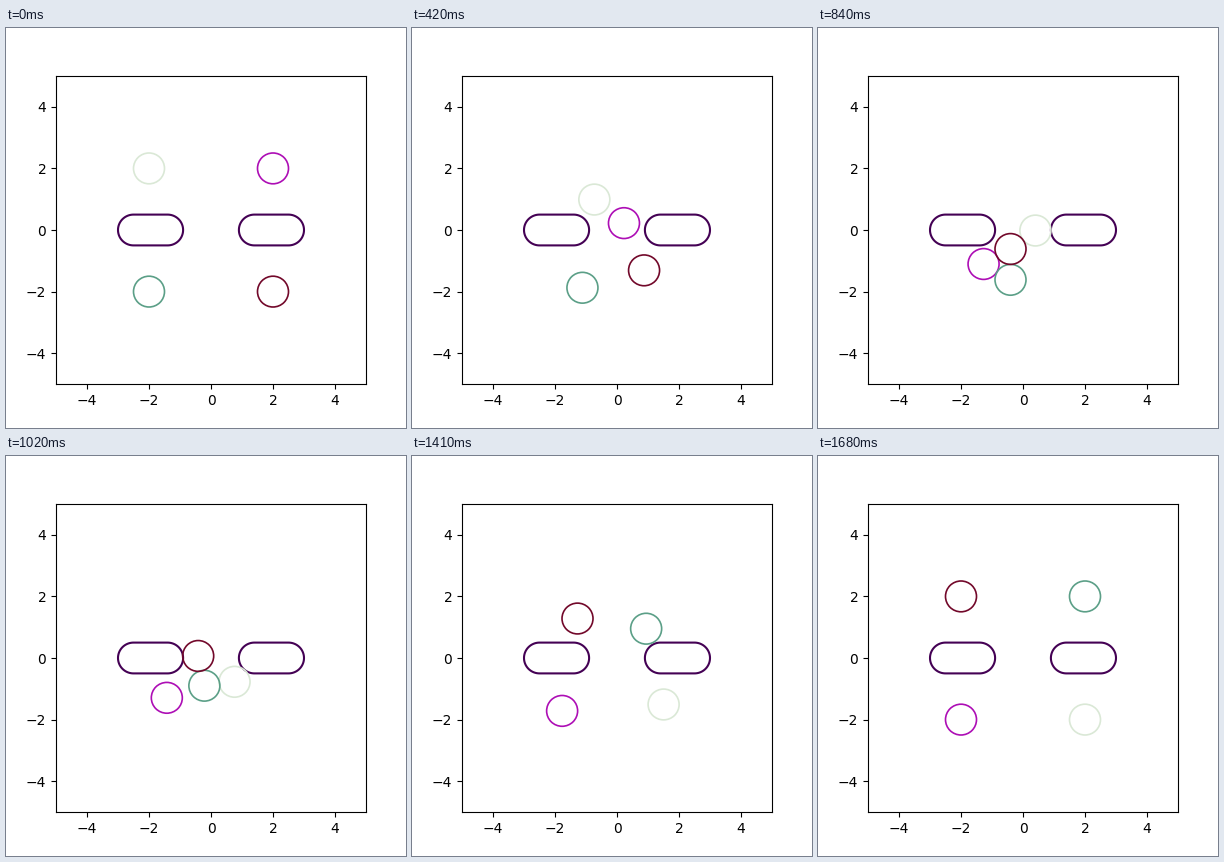
Recreate the animation shown at these times as a matplotlib script. Size 400 px wide and 400 px high, loop 1710 ms.

```python
import numpy as np
import matplotlib.pyplot as plt
from matplotlib.animation import FuncAnimation
from matplotlib.patches import Circle, Polygon

STEPS = 38               # moves from start to goal
TICKS, TICK_MS = 57, 30
RADIUS = 0.5
INNER, OUTER = 1.4, 2.5  # ends of each wall's core, mirrored in x


def rim(side, degrees):
    """Where a disc touches the rounded inner end of a wall."""
    a = np.radians(degrees)
    return side * INNER + 2 * RADIUS * np.cos(a), 2 * RADIUS * np.sin(a)


def capsule(left, right):
    """Outline of a segment on the x axis, grown by RADIUS."""
    a = np.linspace(-np.pi / 2, np.pi / 2, 40)
    x, y = RADIUS * np.cos(a), RADIUS * np.sin(a)
    return np.column_stack([np.r_[right + x, left - x], np.r_[y, -y]])


def route(start, bends):
    """Steady motion from start to the opposite corner through the bends."""
    stops = {0: start, **bends, STEPS: (-start[0], -start[1])}
    points = np.array(list(stops.values()))
    steps = np.arange(STEPS + 1)
    return np.column_stack([np.interp(steps, list(stops), c) for c in points.T])


# Discs run straight, bending where they meet each other or a wall end
DISCS = [
    ("#dae8d6", route((-2, 2), {
        13: (-0.35, 0.685), 19: rim(1, 181), 20.6: rim(1, 203), 22.2: rim(1, 225)})),
    ("#ad0eb5", route((2, 2), {
        7.35: rim(1, 135), 13: (-0.305, -0.325), 17: (-1.01, -0.88),
        19: (-1.272, -1.104)})),
    ("#5b9f87", route((-2, -2), {
        17: (-0.495, -1.787), 19: (-0.403, -1.617), 23.5: (-0.19, -0.81),
        29.55: rim(1, 150), 30.6: rim(1, 135)})),
    ("#72082a", route((2, -2), {
        15: (0.31, -0.965), 17: (-0.01, -0.83), 19: (-0.403, -0.617),
        22.6: rim(-1, 0), 24.9: rim(-1, 22.5), 27.2: rim(-1, 45)})),
]

fig, ax = plt.subplots(figsize=(4, 4), dpi=100)
ax.set(xlim=(-5, 5), ylim=(-5, 5))

for ends in ((-OUTER, -INNER), (INNER, OUTER)):
    ax.add_patch(Polygon(capsule(*ends), fill=False, ec="#440154", lw=1.5))

circles = [ax.add_patch(Circle(path[0], RADIUS, fill=False, ec=color, lw=1.2))
           for color, path in DISCS]


def update(tick):
    # two steps for every three ticks
    step = (2 * tick + 2) // 3
    for circle, (_, path) in zip(circles, DISCS):
        circle.center = tuple(path[step])
    return circles


anim = FuncAnimation(fig, update, frames=TICKS, interval=TICK_MS,
                     repeat=True, repeat_delay=0, blit=False)
plt.show()
```
